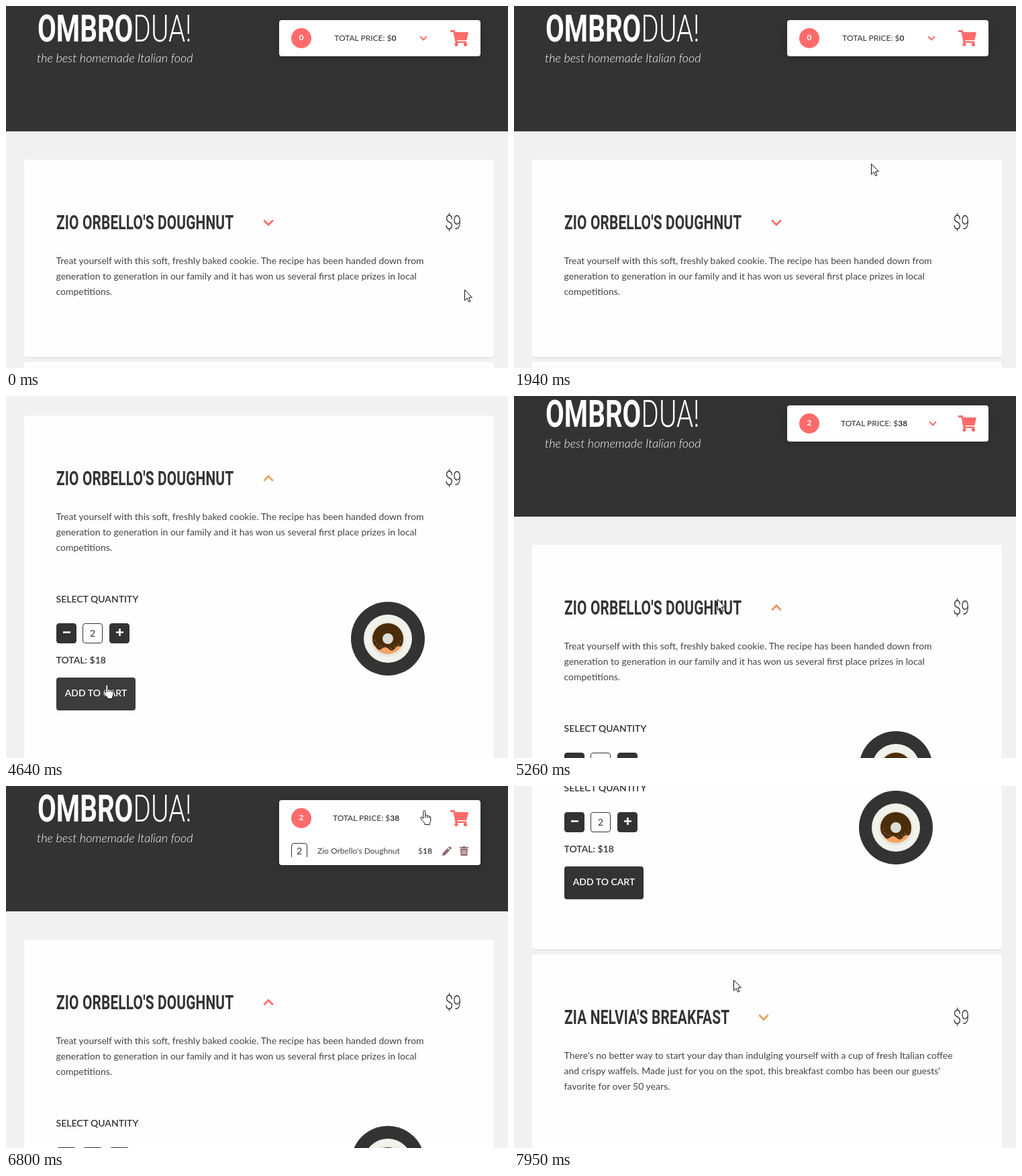
Recreate the animation shown at these times as an HTML page. Size 748x540 px, loop 8 s.

```html
<!DOCTYPE html>
<html lang="en">
<head>
<meta charset="utf-8">
<title>Food order page</title>
<style>
  * { box-sizing: border-box; }
  html, body { margin: 0; width: 100%; height: 100%; overflow: hidden; }
  body { position: relative; background: #f1f1f1; color: #333; font: 14px/23px Lato, sans-serif; white-space: nowrap; }
  #page, #page > *, .card > *, .details > *, .row > *, #pointer { position: absolute; }
  svg { display: block; overflow: visible; }
  #page { left: 0; top: 0; width: 748px; }
  .top { left: 0; top: 0; width: 748px; height: 187px; background: #333; }
  /* Condensed display face */
  .display { font-family: Roboto, sans-serif; transform: scaleX(.72); transform-origin: left; }
  .brand { left: 47px; top: 4px; font-size: 56px; line-height: 60px; font-weight: 300; color: #fff; }
  .tagline { left: 46px; top: 65px; font-size: 18px; line-height: 24px; font-weight: 300; font-style: italic; color: #fff; }

  .card { left: 27px; width: 700px; background: #fefefe; border-radius: 4px; box-shadow: 0 1px 1px #0000001a; }
  .title { left: 48px; top: 74px; font-size: 29px; line-height: 40px; font-weight: 600; letter-spacing: .2px; }
  .price { right: 49px; top: 74px; font-size: 30px; line-height: 40px; font-weight: 300; transform-origin: right; }
  .chevron { color: #ff6b6b; }
  .card .chevron { top: 89px; }
  .text { left: 47.5px; top: 139px; color: #444; }
  .details { left: 0; top: 220px; width: 700px; overflow: hidden; font-weight: 600; }
  .box { width: 30px; height: 30px; border-radius: 4px; border: 1px solid #333; text-align: center; line-height: 28px; font-weight: 400; }
  .dark { background: #333; color: #fff; }
  .add { left: 48px; top: 171px; width: 118px; height: 49px; line-height: 46px; text-align: center; border-radius: 4px; }

  #cart { left: 407px; top: 21px; width: 300px; background: #fff; border-radius: 4px; box-shadow: 0 2px 12px #0003; font-size: 12px; line-height: 20px; }
  .head { height: 54px; padding: 0 18px; display: flex; align-items: center; justify-content: space-between; }
  .badge { width: 30px; height: 30px; border-radius: 50%; background: #ff6b6b; color: #fff; font-weight: 700; text-align: center; line-height: 28px; }
  #body { margin: 0 18px; overflow: hidden; }
  .row { position: relative; height: 64px; color: #444; }
  .row .box { top: 10px; width: 24px; height: 24px; font-size: 14px; line-height: 22px; color: #333; }
  .sums { height: 86px; padding-top: 12px; border: solid #ddd; border-width: 1px 0; margin-bottom: 12px; color: #444; }
  .sums div { display: flex; justify-content: space-between; }
  .field { height: 41px; border: 1px solid #333; border-radius: 4px; margin-bottom: 6px; padding-left: 12px; font: 13.33px/39px "Liberation Sans", Arial, sans-serif; color: #757575; }
  .order { height: 41px; line-height: 40px; border-radius: 4px; text-align: center; font-weight: 600; font-size: 14px; }
</style>
</head>
<body>
<div id="page"></div>
<div id="pointer">
  <svg id="arrow" width="12" height="19" fill="#fff" stroke="#111"><path d="M.5 .5V16.2L4.1 12.8 6.6 18.4 8.9 17.4 6.5 11.9H11.5Z"/></svg>
  <svg id="hand" width="17" height="22" fill="#fff" stroke="#111" style="margin-left:-6px">
    <path d="M4.8 12V2.2a1.5 1.5 0 0 1 3 0V7.6q2-.8 2.8.7 2-.6 2.7.9 2.5-.2 2.5 2V15q0 2.6-1.5 4.6v2H7v-2Q3.6 16.5 1 12.6 .3 10.7 1.8 10.3 3.3 10.2 4.8 12.5z"/>
    <path d="M7.8 8v3.5M10.6 8.5v3M13.3 9.5v2.5"/>
  </svg>
</div>
<script>
const $ = id => document.getElementById(id);

const svg = (w, h, inner, attrs = '') => `<svg width="${w}" height="${h}" fill="currentColor" ${attrs}>${inner}</svg>`;
const chevron = (id, w, h, stroke, style = '') => svg(w, h,
  `<path d="M1.2 1.5L${w / 2} ${h - 1.5}L${w - 1.2} 1.5" fill="none" stroke="currentColor" stroke-width="${stroke}"/>`,
  `id="${id}" class="chevron" style="${style}"`);

const cartIcon = svg(27, 24, `<path d="M1 0h5q.9 0 1 .9l.4 2.1h18.4q1.3 0 1 1.4l-2.2 9.7q-.2.9-1.1.9H10.2l.3 1.5h12.6q1.3 0 1.1 1.4l-.3 1.1H7.7L4.4 3H1Q0 3 0 2V1Q0 0 1 0z"/>
  <circle cx="9" cy="21.4" r="2.6"/><circle cx="22.5" cy="21.4" r="2.6"/>`, 'style="color:#ff6b6b"');
const pencil = svg(14, 14, '<path d="M0 14L.8 10 8 2.8 11.2 6 4 13.2zM9 1.8L10.3.5q.8-.7 1.6 0l1.6 1.6q.7.8 0 1.6L12.2 5z"/>',
  'style="left:225px;top:15px;color:#8f666b"');
const trash = svg(13, 14, '<path d="M0 1h4l.6-1h3.8L9 1h4v1.7H0zM1 3.6h11L11.3 14H1.7z"/><path d="M4 5.5v6.5M6.5 5.5v6.5M9 5.5v6.5" stroke="#fff"/>',
  'style="left:251px;top:15px;color:#8f666b"');
const bars = (d, left) => `<div class="box dark" style="left:${left}px;top:90px">${
  svg(28, 28, `<path d="${d}" stroke="currentColor" stroke-width="2.6"/>`)}</div>`;
const plate = svg(110, 110, `<circle cx="55" cy="55" r="55" fill="#333"/>
  <circle cx="55" cy="55" r="36" fill="#f2f2ed"/><circle cx="55" cy="56" r="26" fill="#e7e7e1"/>
  <circle cx="55" cy="55" r="23" fill="#f2a463"/>
  <path fill="#4b2d0b" d="M32 55A23 23 0 0 1 78 55Q78 64 74 67 70 64 66 69 61 76 56 70 50 66 46 70 41 74 37 67 32 64 32 55z"/>
  <path d="M36 57A19 13 0 0 0 74 57M40 63A16 8 0 0 0 70 62" fill="none" stroke="#e9d3ae" stroke-dasharray="1 5"/>
  <circle cx="55" cy="55" r="8" fill="#dcdcd8"/>`, 'style="left:487px;top:58px"');

const card = (id, title, chevronX, text, more = '') => `<div class="card" id="${id}">
  <div class="title display">${title}</div>
  ${chevron(id + 'Chevron', 16, 10, 2.7, `left:${chevronX}px`)}
  <div class="price display">$9</div>
  <div class="text">${text.join('<br>')}</div>${more}</div>`;
const sum = (label, id) => `<div><span>${label}</span><span>$<b id="${id}"></b></span></div>`;

$('page').innerHTML = `<div class="top"></div>
  <div class="brand display"><b>OMBRO</b>DUA!</div>
  <div class="tagline">the best homemade Italian food</div>
  ${card('first', "ZIO ORBELLO'S DOUGHNUT", 356, [
    'Treat yourself with this soft, freshly baked cookie. The recipe has been handed down from',
    'generation to generation in our family and it has won us several first place prizes in local',
    'competitions.'],
    `<div class="details" id="details">
      <div style="left:47.5px;top:42px">SELECT QUANTITY</div>
      ${bars('M9 12.5h11', 48)}<div class="box" id="quantity" style="left:87px;top:90px"></div>${bars('M9 12.5h11M14.5 7v11', 127)}
      <div style="left:47.5px;top:133px">TOTAL: $<span id="total"></span></div>
      <div class="add dark" id="add">ADD TO CART</div>${plate}
    </div>`)}
  ${card('second', "ZIA NELVIA'S BREAKFAST", 337, [
    "There's no better way to start your day than indulging yourself with a cup of fresh Italian coffee",
    "and crispy waffels. Made just for you on the spot, this breakfast combo has been our guests'",
    'favorite for over 50 years.'])}
  <div id="cart">
    <div class="head"><div class="badge" id="count"></div><div>TOTAL PRICE: $<b id="headTotal"></b></div>
      ${chevron('cartChevron', 12, 8, 2)}${cartIcon}</div>
    <div id="body">
      <div class="row" id="row"><div class="box">2</div><span style="left:39px;top:12px">Zio Orbello's Doughnut</span>
        <span style="right:54px;top:12px">$<b>18</b></span>${pencil}${trash}</div>
      <div class="sums">${sum('Subtotal:', 'subtotal')}${sum('Delivery:', 'delivery')}${sum('<b>Total:</b>', 'cartTotal')}</div>
      <div class="field">Your phone</div><div class="field">Your address</div><div class="order dark">ORDER</div>
    </div>
  </div>`;

const LOOP = 8000;
const clamp = p => Math.min(1, Math.max(0, p));
const ramp = (t, start, length) => clamp((t - start) / length);
const ease = (t, start, length) => 1 - (1 - ramp(t, start, length)) ** 2.2;
const within = (t, ...spans) => spans.some(([a, b]) => t >= a && t < b);

// Pointer path: time, x, y
const path = [
  [70, 683, 423], [300, 640, 250], [470, 580, 70], [600, 592, 29], [760, 618, 41],
  [1500, 618, 41], [1530, 621, 43], [1690, 621, 43], [1940, 532, 235],
  [2150, 532, 235], [2450, 410, 318], [3150, 410, 318], [3790, 176, 347],
  [4060, 174, 349], [4270, 104, 428], [4410, 150, 430], [4640, 150, 430], [4700, 157, 422],
  [4780, 152, 430], [5020, 152, 430], [5770, 623, 36], [7130, 623, 36], [7400, 377, 196], [7950, 327, 289]
];
function pointerAt(t) {
  const i = path.findIndex(k => k[0] > t);
  if (i === 0) return path[0].slice(1);
  if (i < 0) return path.at(-1).slice(1);
  const a = path[i - 1], b = path[i], p = ramp(t, a[0], b[0] - a[0]);
  return [1, 2].map(n => Math.round(a[n] + (b[n] - a[n]) * p));
}

const CORAL = [255, 107, 107], AMBER = [232, 165, 92];
function setChevron(id, open, warmth) {
  const rgb = CORAL.map((c, i) => Math.round(c + (AMBER[i] - c) * warmth));
  $(id).style.color = `rgb(${rgb})`;
  $(id).style.transform = `rotate(${-180 * open}deg)`;
}

function render(t) {
  const scroll = 200 * (ease(t, 3000, 234) - ease(t, 5010, 320)) + 500 * ramp(t, 7355, 545);
  $('page').style.top = -Math.round(scroll) + 'px';

  const expanded = ease(t, 2480, 390), grow = Math.round(220 * expanded);
  $('first').style.cssText = `top:229px;height:${295 + grow}px`;
  $('second').style.cssText = `top:${531 + grow}px;height:295px`;
  $('details').style.height = grow + 'px';
  setChevron('firstChevron', expanded, .6 * ramp(t, 2400, 300) + .4 * ramp(t, 3100, 690) - ramp(t, 5020, 750));
  setChevron('secondChevron', 0, .9);

  const two = t >= 4050;
  $('quantity').textContent = two ? 2 : 1;
  $('total').textContent = two ? 18 : 9;
  $('add').style.background = within(t, [4240, 5060]) ? '#3c3c3c' : '#333';

  const filled = t >= 4700;
  const open = ease(t, 870, 360) - ease(t, 1640, 290) + ease(t, 5840, 405) - ease(t, 6580, 370);
  const height = Math.round(54 + open * (filled ? 320 : 256));
  $('cart').style.height = height + 'px';
  $('body').style.height = Math.max(0, height - 66) + 'px';
  $('row').style.display = filled ? 'block' : 'none';
  $('count').textContent = filled ? 2 : 0;
  $('subtotal').textContent = filled ? 18 : 0;
  $('delivery').textContent = filled ? 20 : 0;
  $('headTotal').textContent = $('cartTotal').textContent = filled ? 38 : 0;
  setChevron('cartChevron', open, .4 * ramp(t, 7170, 200));

  const [x, y] = pointerAt(t);
  const hand = within(t, [540, 1735], [2400, 3250], [3720, 5080], [5700, 7190]);
  $('pointer').style.cssText = `left:${x}px;top:${y}px`;
  $('hand').style.display = hand ? 'block' : 'none';
  $('arrow').style.display = hand ? 'none' : 'block';
}

function frame() {
  render(performance.now() % LOOP);
  requestAnimationFrame(frame);
}
frame();
</script>
</body>
</html>
```
